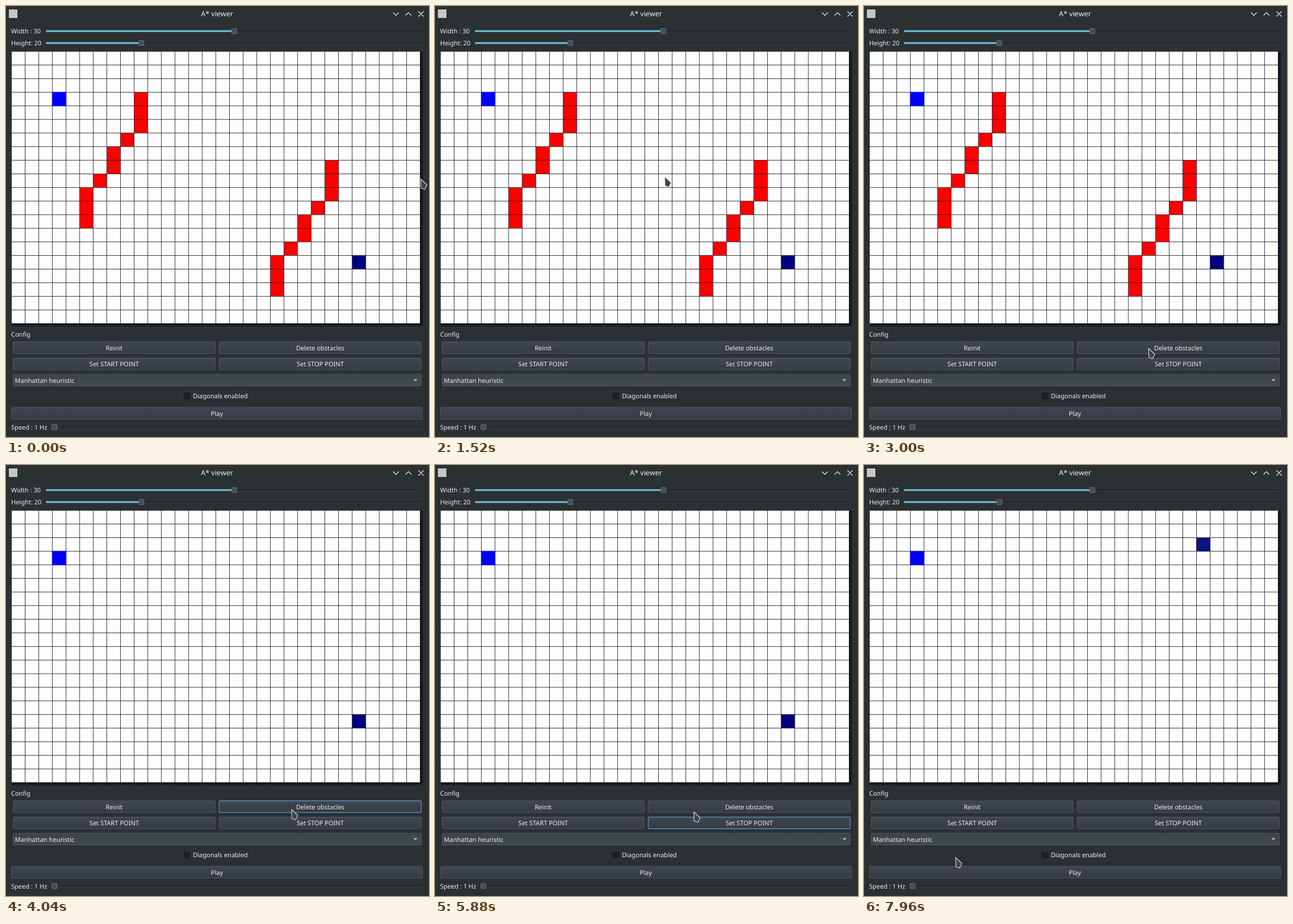
An HTML page that plays this animation: 741 px wide and 756 px high, repeating every 8 s.

```html
<!DOCTYPE html>
<html lang="en">
<head>
<meta charset="utf-8">
<title>A* viewer</title>
<style>
  html, body { margin: 0; width: 100%; height: 100%; overflow: hidden; background: #2b3033; }
  svg { display: block; width: 741px; height: 756px; }
  text { font: 11px "Noto Sans", sans-serif; fill: #eceeef; white-space: pre; text-rendering: geometricPrecision; }
  .mid { text-anchor: middle; }
  .title { font-size: 12.5px; }
  .button { fill: url(#face); stroke: #51575d; }
  .combo { fill: url(#comboFace); }
  .handle { fill: #484d51; stroke: #6b7074; }
  .icon { fill: none; stroke: #eceeef; stroke-width: 1.2; }
  .focus { fill: none; stroke: #5586bd; stroke-width: 1.3; }
  .wall, .oldStop, .newStop, .focus, #cursor { animation: 8s step-end infinite; }
  .wall { fill: #fd0000; animation-name: wall; }
  .oldStop { fill: #000080; animation-name: oldStop; }
  .newStop { fill: #0a1480; animation-name: newStop; }
  .focusDelete { animation-name: focusDelete; }
  .focusStop { animation-name: focusStop; }
  #cursor { animation-name: travel; animation-timing-function: ease-in-out; }

  @keyframes wall { 0% { opacity: 1 } 47.5%, 100% { opacity: 0 } }
  @keyframes oldStop { 0% { opacity: 1 } 88.5%, 100% { opacity: 0 } }
  @keyframes newStop { 0% { opacity: 0 } 88.5%, 100% { opacity: 1 } }
  @keyframes focusDelete { 0% { opacity: 0 } 47.5% { opacity: 1 } 68.5%, 100% { opacity: 0 } }
  @keyframes focusStop { 0% { opacity: 0 } 68.5% { opacity: 1 } 88.5%, 100% { opacity: 0 } }
  @keyframes travel {
    0% { transform: translate(726px, 303px) }
    19%, 21% { transform: translate(402px, 299px) }
    37.5% { transform: translate(498px, 600px) }
    42%, 49% { transform: translate(502px, 603px) }
    63% { transform: translate(399px, 629px) }
    67%, 69% { transform: translate(420px, 630px) }
    73.5% { transform: translate(453px, 608px) }
    84% { transform: translate(584px, 162px); animation-timing-function: ease-out }
    88%, 95% { transform: translate(592px, 137px) }
    99.5%, 100% { transform: translate(160px, 688px) }
  }
</style>
</head>
<body>
<svg id="stage" viewBox="0 0 741 756" xmlns="http://www.w3.org/2000/svg"></svg>
<script>
const COLS = 30, ROWS = 20, CELL = 23.867, LINE = 0.9;
const gridX = col => 9.6 + CELL * col;
const gridY = row => 79.65 + CELL * row;

const rect = (x, y, w, h, attrs) =>
  `<rect x="${x}" y="${y}" width="${w}" height="${h}" ${attrs}/>`;
const text = (x, y, label, cls = "") =>
  `<text x="${x}" y="${y}" class="${cls}">${label}</text>`;
const range = n => [...Array(n).keys()];

const cell = (col, row, attrs, grow = 0) => rect(gridX(col) - grow, gridY(row) - grow,
  CELL + 2 * grow, CELL + 2 * grow, attrs);

// Columns of one slanted wall, right to left, with the rows each spans.
const WALL = [[9, 3, 3], [8, 6, 1], [7, 7, 2], [6, 9, 1], [5, 10, 3]];
const wall = (dx, dy) => WALL.map(([col, row, count]) =>
  range(count).map(i => cell(col + dx, row + dy + i, 'class="wall"')).join("")).join("");

function grid() {
  const left = gridX(0), top = gridY(0);
  const width = COLS * CELL, height = ROWS * CELL;
  const columns = range(COLS + 1).map(i =>
    rect(gridX(i) - LINE / 2, top, LINE, height, 'fill="#1e1e38"')).join("");
  const rows = range(ROWS + 1).map(i =>
    rect(left, gridY(i) - LINE / 2, width, LINE, 'fill="#20201a"')).join("");
  return rect(726, 80, 5, 481, 'fill="url(#shadeRight)"')
    + rect(10, 557, 717, 5, 'fill="url(#shadeDown)"')
    + rect(left, top, width, height, 'fill="#fdfdfd"')
    + wall(0, 0) + wall(14, 5)
    + cell(25, 15, 'class="oldStop"') + cell(24, 2, 'class="newStop"')
    + columns + rows
    + cell(3, 3, 'fill="#0000fb"', LINE / 2);
}

function slider(label, y, start, handleX) {
  return text(9, y + 4, label)
    + rect(start, y - 1, 729 - start, 2, 'rx="1" fill="#22262a"')
    + rect(start, y + 1, 729 - start, 1, 'fill="#373c40"')
    + rect(start, y - 1.5, Math.max(0, handleX - start - 5), 3, 'rx="1" fill="#6fc0de"')
    + rect(handleX - 4.5, y - 4.5, 9, 9, 'rx="1" class="handle"');
}

function button(x, y, w, label, focusClass) {
  const box = cls => rect(x + .5, y, w - 1, 20.5, `rx="1.5" class="${cls}"`);
  return box("button") + (focusClass ? box("focus " + focusClass) : "")
    + text(x + w / 2, y + 14.5, label, "mid");
}

const gradient = (id, from, to, horizontal) =>
  `<linearGradient id="${id}" x2="${horizontal ? 1 : 0}" y2="${horizontal ? 0 : 1}">
    <stop stop-color="${from}"/><stop offset="1" stop-color="${to}"/></linearGradient>`;

document.getElementById("stage").innerHTML = `<defs>
  ${gradient("face", "#414750", "#353b42")}
  ${gradient("comboFace", "#3c444a", "#434a4b")}
  ${gradient("shadeRight", "#0b0d0e", "#23282b", true)}
  ${gradient("shadeDown", "#0b0d0e", "#23282b")}</defs>`
  + rect(0, 0, 741, 756, 'fill="#2b3033"')
  + rect(5, 6, 15, 15, 'fill="#c6c6c4"')
  + text(369.7, 18, "A* viewer", "mid title")
  + '<path class="icon" d="M678 11.5l5 5 5-5M700 16.5l5-5 5 5M722.5 9.5l9 9m0-9l-9 9"/>'
  + slider("Width : 30", 44, 70, 400)
  + slider("Height: 20", 65, 70, 237)
  + grid()
  + text(9, 579.5, "Config")
  + rect(9.5, 585.5, 721, 113, 'rx="2" fill="none" stroke="#272c30"')
  + button(12, 589, 355, "Reinit")
  + button(373, 589, 355, "Delete obstacles", "focusDelete")
  + button(12, 617.5, 355, "Set START POINT")
  + button(373, 617.5, 355, "Set STOP POINT", "focusStop")
  + rect(12.5, 646, 715, 20.5, 'rx="1.5" class="button combo"')
  + text(15.6, 660.5, "Manhattan heuristic")
  + '<path d="M713.5 654.5h7.5l-3.75 4z" fill="#aeb5b5"/>'
  + rect(311, 678, 12, 12, 'rx="1" fill="#1c2023"')
  + text(327.5, 688, "Diagonals enabled")
  + button(9, 704, 721, "Play")
  + slider("Speed : 1 Hz", 738.5, 80, 85)
  + `<path id="cursor" d="M.5 .5L11.5 11 7.4 18.8 1 16.3z"
      fill="#3e4346" stroke="#d9dbdc" stroke-width="1.1" stroke-linejoin="round"/>`;
</script>
</body>
</html>
```
